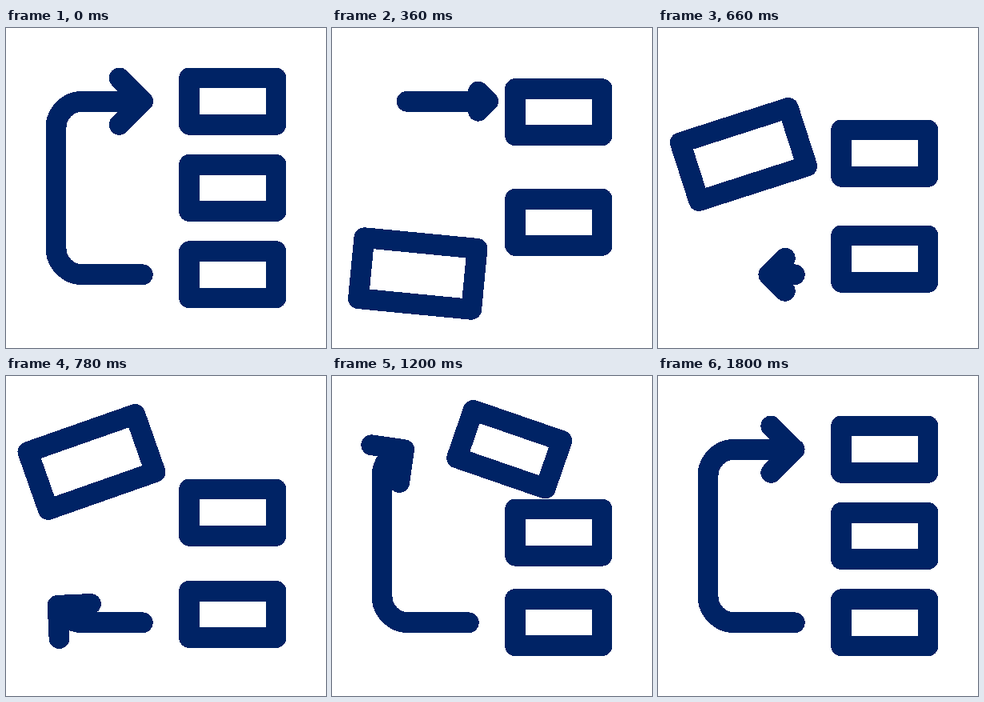
Write an HTML page that moves like this. It is 400 by 400 pixels and loops after 3.83 s.

```html
<!DOCTYPE html>
<html lang="en">
<head>
<meta charset="utf-8">
<title>Reorder list</title>
<style>
  html, body { margin: 0; width: 100%; height: 100%; overflow: hidden; background: #fff; }
  svg { display: block; width: 100%; height: 100%; }
  path {
    fill: none; stroke: #002365; stroke-width: 25.8;
    stroke-linecap: round; stroke-linejoin: round; shape-rendering: crispEdges;
  }
</style>
</head>
<body>
<svg viewBox="0 0 400 400">
  <path id="shaft" d="M170.8 308.3H95.8A33.3 33.3 0 0 1 62.5 275V125A33.3 33.3 0 0 1 95.8 91.7H225"/>
  <path id="head"/>
  <path id="upper"/>
  <path id="lower"/>
  <path id="mover"/>
</svg>
<script>
const LOOP = 3830, STEP = 30, END = 1800;
const COL = 283.3, TOP = 91.7, GAP = 108.3;
const FULL = 404.7;          // shaft length at rest
const PUSH = 41;             // how far the head slides on as it vanishes
const LAG = 15.6;            // the head turns slightly after the shaft
const OUT = 470, IN = 610;   // arrow is hidden between these times

const [shaft, head, upper, lower, mover] =
  ['shaft', 'head', 'upper', 'lower', 'mover'].map(id => document.getElementById(id));

// 0 to 1 between two times; a softens the start, b the end.
function ease(t, from, to, a = 2, b = 4) {
  const p = Math.min(1, Math.max(0, (t - from) / (to - from)));
  return 1 - (1 - p ** a) ** b;
}

// The moving box swings from one tilt to the next and settles.
const SWINGS = [[0, 0], [120, 23], [760, -20], [1252, 20], [1490, -10], [END, 0]];
function tilt(t) {
  return SWINGS.slice(1).reduce((sum, [time, angle], i) => {
    const [start, last] = SWINGS[i];
    return sum + (angle - last) * ease(t, start, time, 1.5, 2);
  }, 0);
}

function drawBox(el, x, y, size = 1, turn = 0) {
  const w = 54.15 * size, h = 29.15 * size;
  el.setAttribute('d', `M${-w} ${-h}H${w}V${h}H${-w}Z`);
  el.setAttribute('transform', `translate(${x} ${y}) rotate(${turn})`);
}

function drawArrow(from, to, size) {
  const at = l => shaft.getPointAtLength(l);
  const back = Math.max(1, to - LAG);
  const tip = at(to), a = at(back - 1), b = at(back + 1);
  const turn = Math.atan2(b.y - a.y, b.x - a.x) * 180 / Math.PI;
  const arm = 29.2 * size;
  shaft.setAttribute('stroke-dasharray', `${Math.max(.01, to - from)} 2000`);
  shaft.setAttribute('stroke-dashoffset', -from);
  head.setAttribute('d', `M${-arm} ${-arm}L0 0L${-arm} ${arm}`);
  head.setAttribute('transform', `translate(${tip.x} ${tip.y}) rotate(${turn})`);
}

function render(t) {
  const shown = t < OUT || t > IN;
  shaft.style.display = head.style.display = shown ? '' : 'none';
  if (t < OUT) {
    const gone = ease(t, 0, OUT, 2, 1);
    drawArrow((FULL + PUSH) * ease(t, 0, OUT, 2, 1.5), FULL + PUSH * gone, 1 - gone);
  } else if (t > IN) {
    drawArrow(0, FULL * ease(t, IN, 1921, 1.1, 3), ease(t, IN, IN + 110, 1, 2));
  }

  drawBox(upper, COL, TOP + GAP * ease(t, 290, 1855, 1.1));
  drawBox(lower, COL, TOP + GAP * (1 + ease(t, 180, 1435, 1.1)));

  const aside = ease(t, 0, 400) - ease(t, 950, 1470);
  const grown = ease(t, 0, 340) - ease(t, 925, 1440);
  const lift = ease(t, 335, 977);
  drawBox(mover, COL - 176.3 * aside, TOP + 2 * GAP * (1 - lift), 1 + .31 * grown, tilt(t));
}

function tick() {
  const t = performance.now() % LOOP;
  render(Math.min(END, Math.floor(t / STEP) * STEP));
  requestAnimationFrame(tick);
}
tick();
</script>
</body>
</html>
```
